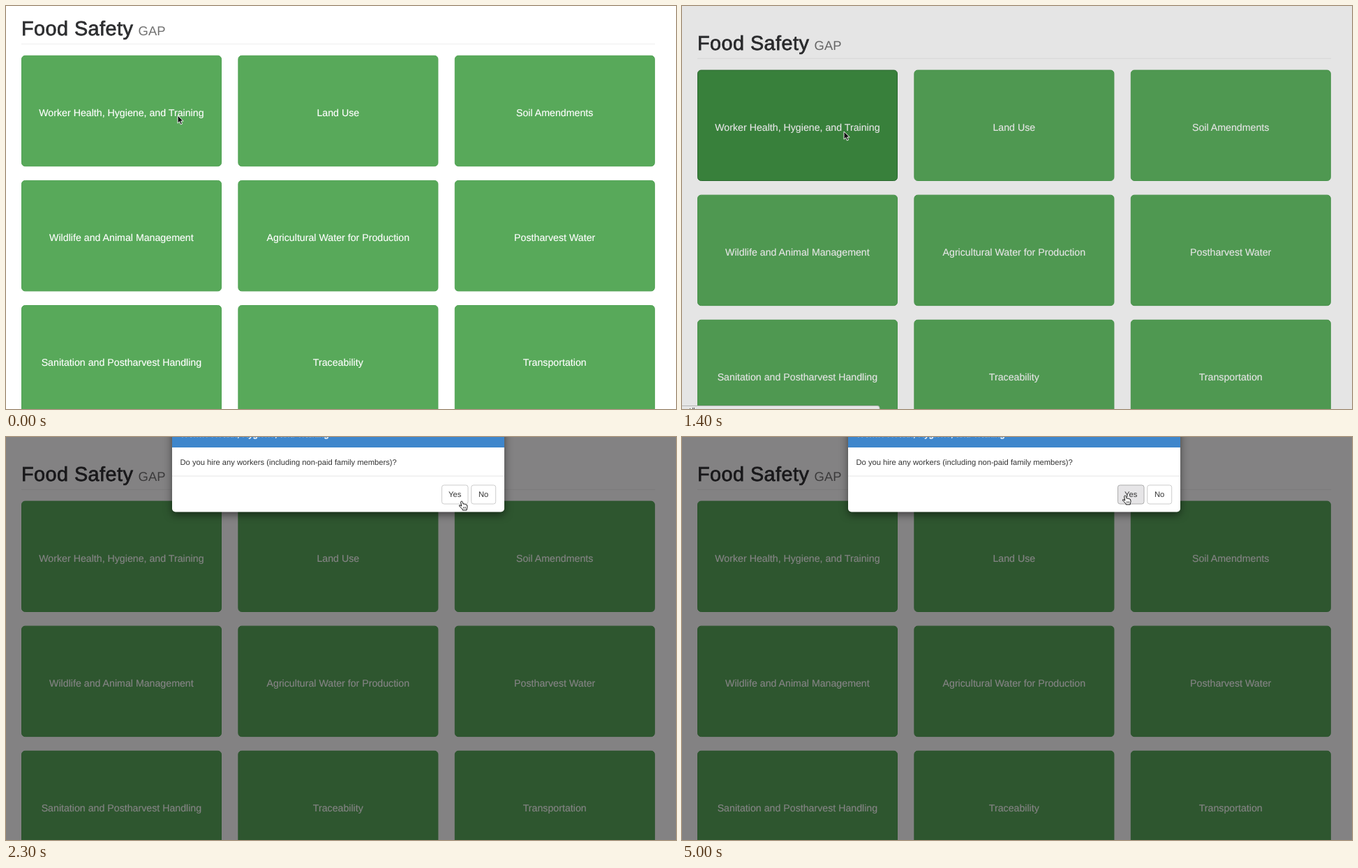
Write an HTML page that moves like this. It is 960 px wide and 578 px high and loops after 5100 ms.

```html
<!DOCTYPE html>
<html lang="en">
<head>
<meta charset="utf-8">
<title>Food Safety</title>
<style>
  html, body { margin: 0; width: 100%; height: 100%; overflow: hidden; background: #fff; }
  svg { display: block; width: 960px; height: 578px; }
  text { font: 11.2px "Liberation Sans", Arial, sans-serif; fill: #333; text-rendering: geometricPrecision; }
  .mid { text-anchor: middle; }
  .title { font-size: 28.8px; letter-spacing: .45px; fill: #2d2e30; stroke: #2d2e30; stroke-width: .75px; }
  .sub { font-size: 18.4px; fill: #707070; }
  .tile rect { fill: #58a95a; stroke: #50a253; }
  .tile text { font-size: 14.2px; fill: #fff; stroke: #fff; stroke-width: .15px; }
  .tile.hover rect { fill: #3e8e42; stroke: #2f7434; }
  .tile.press rect { fill: #357936; stroke: #24592a; }
  .dialog { filter: drop-shadow(0 4px 6px rgba(0, 0, 0, .5)); }
  .heading { font-size: 12.8px; fill: #fff; stroke: #fff; stroke-width: .4px; }
  .btn rect { fill: #fff; stroke: #ccc; }
  .btn.hover rect { fill: #e6e5e7; stroke: #adadad; }
</style>
</head>
<body>
<svg viewBox="0 0 960 578">
  <g id="page">
    <text class="title" x="22" y="42">Food Safety</text>
    <text class="sub" x="189.6" y="42">GAP</text>
    <path d="M22 54.5H930" stroke="#eee"/>
    <g id="tiles"></g>
  </g>
  <rect id="shade" width="960" height="578" fill="#040004"/>
  <g id="modal">
    <rect class="dialog" x="238" y="-30" width="476" height="137.5" rx="4.8" fill="#fff"/>
    <path d="M238 15V-25q0-5 5-5H709q5 0 5 5V15z" fill="#3e86cc"/>
    <text class="heading" x="249.5" y="0">Worker Health, Hygiene, and Training</text>
    <text x="249.5" y="39.8">Do you hire any workers (including non-paid family members)?</text>
    <path d="M238 56H714" stroke="#e5e5e5"/>
    <g class="btn" id="yes">
      <rect x="624.5" y="69" width="37.5" height="27" rx="3.2"/>
      <text class="mid" x="643.2" y="86">Yes</text>
    </g>
    <g class="btn">
      <rect x="666.7" y="69" width="35" height="27" rx="3.2"/>
      <text class="mid" x="684.1" y="86">No</text>
    </g>
  </g>
  <g id="status">
    <path d="M-1 579V573.5H280q3 0 3 3V579" fill="#e6e6e6" stroke="#b5b5b5"/>
    <path d="M11.5 577v1M15.5 576v2M17.5 576v2" stroke="#555"/>
  </g>
  <g id="cursor">
    <path id="arrow" d="M0 0V11.2L2.6 8.8L4.4 13L6.5 12.1L4.7 8H8.2Z" fill="#111" stroke="#fff" stroke-width=".9"/>
    <path id="hand" d="M-1.4 1.2Q-1-.2.3.2Q1 .4 1.2 1.3L2.2 4.2Q3.4 3.3 4.2 4.5Q5.4 3.8 6.1 5Q7.3 4.7 7.7 6L8 8.3Q8.1 9.7 7.2 11V12.9H1.1V11.5L-2.4 8.3Q-4.3 6.4-3.3 5.8Q-2.2 5.4-.3 7.2Z" fill="#fff" stroke="#111" stroke-linejoin="round"/>
    <path id="lines" d="M2.4 8.4V10.6M4 8.4V10.6M5.6 8.4V10.6" stroke="#111" stroke-width=".7"/>
  </g>
</svg>
<script>
  const LOOP = 5100, STEP = 100;
  const $ = id => document.getElementById(id);
  const labels = [
    "Worker Health, Hygiene, and Training", "Land Use", "Soil Amendments",
    "Wildlife and Animal Management", "Agricultural Water for Production", "Postharvest Water",
    "Sanitation and Postharvest Handling", "Traceability", "Transportation"
  ];
  $("tiles").innerHTML = labels.map((label, i) => {
    const x = 22.5 + i % 3 * 310.4, y = 71.3 + Math.floor(i / 3) * 179.1;
    return `<g class="tile"><rect x="${x}" y="${y}" width="286" height="158.4" rx="4.8"/>
      <text class="mid" x="${x + 142.9}" y="${y + 86.5}">${label}</text></g>`;
  }).join("");
  const first = document.querySelector(".tile");

  // Pointer path: time, x, y
  const path = [
    [0, 246, 157], [600, 246, 157], [1200, 232, 181], [1300, 232, 181], [1400, 232, 180],
    [1900, 232, 180], [2300, 653, 92], [2600, 655, 91], [4100, 659, 90], [5000, 635, 84]
  ];
  const clamp = v => Math.min(1, Math.max(0, v));
  const smooth = u => u * u * (3 - 2 * u);
  const show = (id, on) => $(id).style.display = on ? "" : "none";

  function pointer(t) {
    const i = path.findIndex(p => p[0] > t);
    if (i < 0) return path[path.length - 1].slice(1);
    const [t0, x0, y0] = path[i - 1], [t1, x1, y1] = path[i];
    const u = smooth((t - t0) / (t1 - t0));
    return [x0 + (x1 - x0) * u, y0 + (y1 - y0) * u];
  }

  function draw(t) {
    const opened = t >= 1400;
    $("page").setAttribute("transform", `translate(0 ${opened ? 20.8 : 0})`);
    $("shade").setAttribute("opacity", opened ? (t < 1500 ? .1 : .49) : 0);

    const slide = clamp((t - 1500) / 300);
    show("modal", slide > 0);
    $("modal").setAttribute("opacity", clamp(slide * 2));
    $("modal").setAttribute("transform", `translate(0 ${-145 * (1 - slide) ** 2})`);

    const hover = t >= 800 && t < 2000;
    first.classList.toggle("hover", hover);
    first.classList.toggle("press", t >= 1300 && t < 1400);
    show("status", t >= 900 && t < 2000);
    $("yes").classList.toggle("hover", t >= 2400);

    const hand = t >= 2300 || hover && !opened;
    show("arrow", !hand);
    show("hand", hand);
    show("lines", hand);
    $("cursor").setAttribute("transform", `translate(${pointer(t)})`);
  }

  function tick() {
    const t = performance.now() % LOOP;
    draw(Math.floor(t / STEP) * STEP);
    requestAnimationFrame(tick);
  }
  tick();
</script>
</body>
</html>
```
